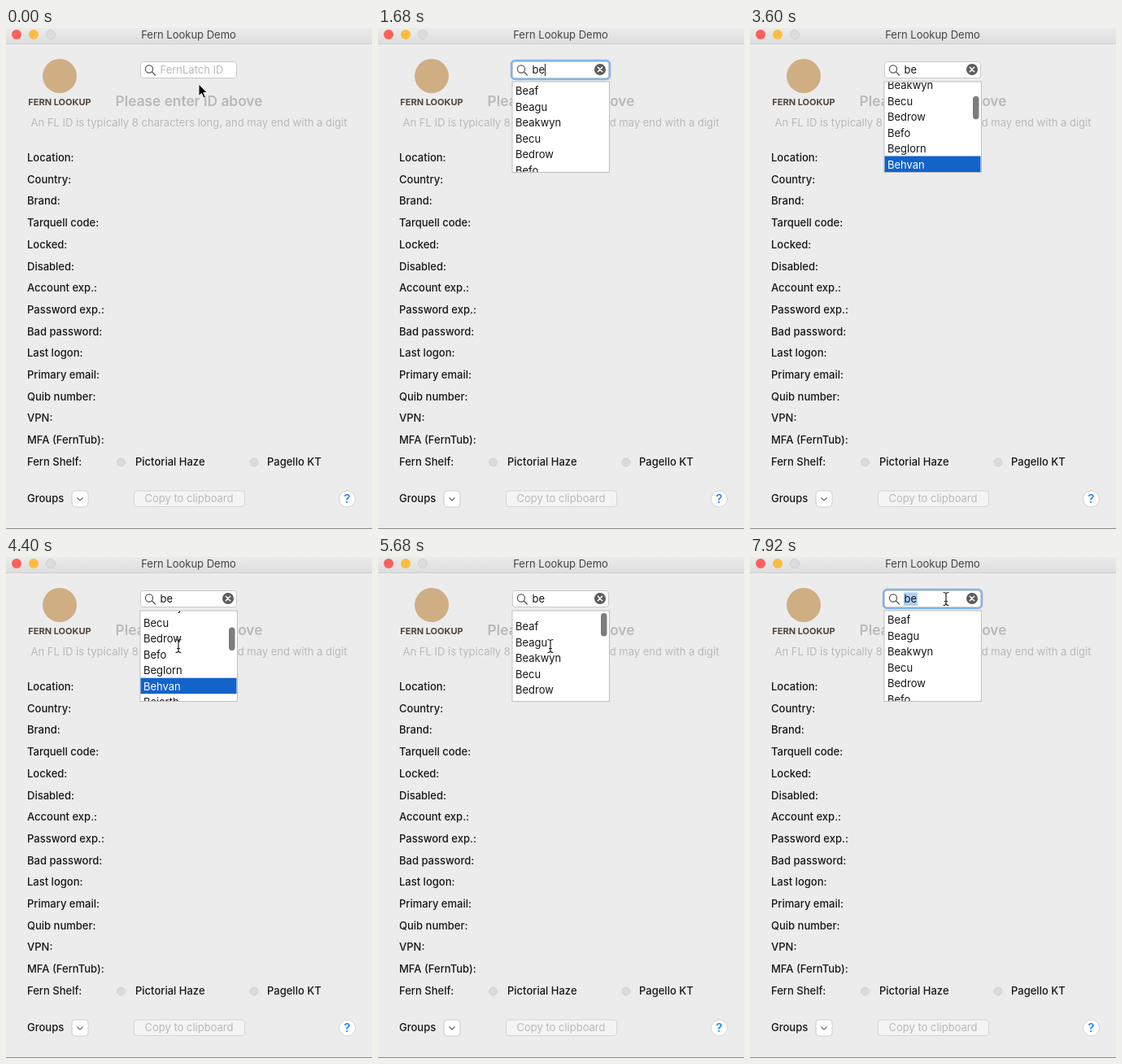
Write an HTML page that moves like this. It is 450 px wide and 616 px high and loops after 8 s.

```html
<!DOCTYPE html>
<html lang="en">
<head>
<meta charset="utf-8">
<title>Fern Lookup Demo</title>
<style>
html, body { margin: 0; width: 100%; height: 100%; overflow: hidden; background: #ececec; }
svg { display: block; width: 450px; height: 616px; }
text { font: 400 13px Inter, "Open Sans", sans-serif; fill: #161616; white-space: pre; }
.label { font-weight: 500; }
.dim { fill: #b9b9b9; }
.mid { text-anchor: middle; }
</style>
</head>
<body>
<svg id="stage" viewBox="0 0 450 616" xmlns="http://www.w3.org/2000/svg">
  <defs>
    <linearGradient id="bar" x2="0" y2="1">
      <stop stop-color="#ebebeb"/><stop offset="1" stop-color="#dedede"/>
    </linearGradient>
    <clipPath id="view"><rect x="165.5" y="66.5" width="118" height="110.5"/></clipPath>
  </defs>
  <rect width="450" height="616" fill="#ececec"/>
  <rect width="450" height="19" fill="url(#bar)"/>
  <path d="M0 19.5H450" stroke="#cfcfcf"/>
  <path d="M0 615.5H450" stroke="#8a8a8a"/>
  <circle cx="13" cy="8" r="6" fill="#fc605b"/>
  <circle cx="34" cy="8" r="6" fill="#fdbc40"/>
  <circle cx="55" cy="8" r="5.7" fill="#dcdcdc" stroke="#cbcbcb" stroke-width=".7"/>
  <text class="mid" x="224.5" y="13" style="fill:#444">Fern Lookup Demo</text>

  <circle cx="66" cy="59" r="21" fill="#cfae84"/>
  <text class="mid" x="66" y="95" style="font-size:11px;font-weight:700;fill:#51443d">FERN LOOKUP</text>
  <text class="mid dim" x="225" y="96" style="font-size:17.3px;font-weight:600">Please enter ID above</text>
  <text class="mid dim" x="225" y="121">An FL ID is typically 8 characters long, and may end with a digit</text>
  <g id="labels"></g>

  <g fill="#dadada" stroke="#cdcdcd" stroke-width=".8">
    <circle cx="141.5" cy="534" r="5"/><circle cx="305" cy="534" r="5"/>
  </g>
  <text class="label" x="159" y="538">Pictorial Haze</text>
  <text class="label" x="321" y="538">Pagello KT</text>
  <rect x="81" y="569" width="20" height="20" rx="4" fill="#fff" stroke="#cecece"/>
  <path d="M87.5 577.5l3.5 3.5 3.5-3.5" fill="none" stroke="#666" stroke-width="1.2"/>
  <rect x="157.5" y="569" width="136" height="19.5" rx="3.5" fill="#f4f4f4" stroke="#d4d4d4"/>
  <text class="mid dim" x="225" y="583">Copy to clipboard</text>
  <circle cx="419.5" cy="579" r="10" fill="#fff" stroke="#cbcbcb" stroke-width=".8"/>
  <text class="mid" x="419.5" y="584" style="font-size:15px;font-weight:500;fill:#157efb">?</text>

  <rect id="ring" x="164.5" y="40.5" width="120" height="22" rx="4" fill="none" stroke="#82b5ee" stroke-width="3.5"/>
  <rect id="field" x="165.5" y="41.5" width="118" height="20" rx="3" fill="#fff" stroke="#c8c8c8"/>
  <g fill="none" stroke="#555" stroke-width="1.2" stroke-linecap="round">
    <circle cx="176" cy="50.5" r="4.6"/><path d="M179.5 54l4 4"/>
  </g>
  <rect id="mark" x="189" y="43.5" width="17" height="16.5" fill="#aed0f8"/>
  <text id="query" x="189.5" y="56"></text>
  <path id="caret" d="M0 44V59" stroke="#222"/>
  <g id="clear">
    <circle cx="273" cy="51" r="7" fill="#5c5c5c"/>
    <path d="M270.3 48.3l5.4 5.4m0-5.4l-5.4 5.4" stroke="#fff" stroke-width="1.5" stroke-linecap="round"/>
  </g>

  <g id="list">
    <rect x="165" y="66" width="119.5" height="111.5" fill="#fff" stroke="#bdbdbd"/>
    <g clip-path="url(#view)">
      <g id="rows"><rect id="pick" x="165" width="119" height="19.5" fill="#1363ca"/></g>
      <rect id="thumb" x="274" width="7.5" height="28.5" rx="3.7" fill="#7d7d7d"/>
    </g>
  </g>

  <path id="arrow" d="M0 0V14.5L3.4 11.4 6 17.2 8.4 16.1 5.8 10.5H10.4Z" fill="#000" stroke="#fff" stroke-width="1"/>
  <g id="beam" fill="none">
    <path id="beamShape" d="M-3.5-8Q0-8 0-5.5V5.5Q0 8-3.5 8M3.5-8Q0-8 0-5.5M0 5.5Q0 8 3.5 8M-2 3H2" stroke="#222" stroke-width="1.2"/>
  </g>
</svg>
<script>
const LOOP = 8000, ROW = 19.5, TOP = 67, VIEW = 110, THUMB_RANGE = 77;
const names = ["Beaf", "Beagu", "Beakwyn", "Becu", "Bedrow", "Befo", "Beglorn", "Behvan", "Bejarth",
  "Bekrind", "Belvox", "Bemquil", "Bepwin", "Beqo", "Bequaz", "Bevlorn", "Bewdo", "Bexu"];
const labels = ["Location", "Country", "Brand", "Tarquell code", "Locked", "Disabled", "Account exp.",
  "Password exp.", "Bad password", "Last logon", "Primary email", "Quib number", "VPN", "MFA (FernTub)", "Fern Shelf"];
const maxScroll = names.length * ROW - VIEW;

const el = {};
document.querySelectorAll("[id]").forEach(n => el[n.id] = n);
const show = (node, on) => node.setAttribute("display", on ? "inline" : "none");
const move = (node, x, y) => node.setAttribute("transform", `translate(${x} ${y})`);

function addText(parent, x, y, str, cls = "") {
  const t = document.createElementNS("http://www.w3.org/2000/svg", "text");
  t.setAttribute("x", x);
  t.setAttribute("y", y);
  t.setAttribute("class", cls);
  t.textContent = str;
  parent.append(t);
  return t;
}

labels.forEach((s, i) => addText(el.labels, 26, 164 + i * 26.7, s + ":", "label"));
addText(el.labels, 26, 583, "Groups", "label");
const rows = names.map((s, i) => addText(el.rows, 169, TOP + 15 + i * ROW, s));

// Eased value along a list of [time, value] keys
function track(keys, t) {
  let i = keys.findIndex(k => k[0] > t);
  if (i < 0) return keys[keys.length - 1][1];
  if (i === 0) return keys[0][1];
  const [t0, a] = keys[i - 1], [t1, b] = keys[i];
  const u = (t - t0) / (t1 - t0);
  return a + (b - a) * u * u * (3 - 2 * u);
}

const mouseX = [[160, 237], [520, 226], [3700, 230], [4250, 212], [6100, 212], [6800, 270], [7080, 270], [7420, 241]];
const mouseY = [[160, 69], [520, 52], [3700, 62], [4250, 109.5], [6100, 109.5], [6800, 50], [7080, 50], [7420, 51.5]];
const wheel = [[4320, 46], [4960, maxScroll + 5], [5120, maxScroll + 5], [5600, -8], [5720, -8], [5920, 0]];

const TYPE_B = 1120, TYPE_E = 1440, KEYS = 2000, KEY_STEP = 170, RESELECT = 7520;

function draw(t) {
  const text = t < TYPE_B ? "" : t < TYPE_E ? "b" : "be";
  const open = t >= TYPE_E;
  const selected = t >= RESELECT;
  const focused = selected || (t >= 640 && t < KEYS);

  show(el.ring, focused);
  show(el.mark, selected);
  show(el.clear, text);
  el.query.textContent = text || "FernLatch ID";
  el.query.setAttribute("class", text ? "" : "dim");
  const typing = t >= TYPE_B && t < KEYS;
  show(el.caret, focused && !selected && (typing || (t - 640) % 1000 < 500));
  move(el.caret, [189.5, 198.5, 205.5][text.length], 0);

  // Arrow keys walk down the list, then the wheel scrolls it
  const pick = t < KEYS || selected ? -1 : Math.min(7, Math.floor((t - KEYS) / KEY_STEP));
  const scroll = t < wheel[0][0] ? Math.max(0, (pick + 1) * ROW - VIEW) : track(wheel, t);
  show(el.list, open);
  move(el.rows, 0, -scroll);
  show(el.pick, pick >= 0);
  el.pick.setAttribute("y", TOP + pick * ROW);
  rows.forEach((r, i) => r.style.fill = i === pick ? "#fff" : "");
  show(el.thumb, t >= KEYS + 5 * KEY_STEP && t < 7200);
  el.thumb.setAttribute("y", 69 + THUMB_RANGE * Math.min(1, Math.max(0, scroll / maxScroll)));

  const x = track(mouseX, t), y = track(mouseY, t);
  const visible = t < TYPE_B || t >= 3760;
  const overText = x < 262 && (y < 62 || open);
  show(el.arrow, visible && !overText);
  show(el.beam, visible && overText);
  move(el.arrow, x, y);
  move(el.beam, x, y);
}

const start = performance.now();
function frame() {
  draw((performance.now() - start) % LOOP);
  requestAnimationFrame(frame);
}
frame();
</script>
</body>
</html>
```
